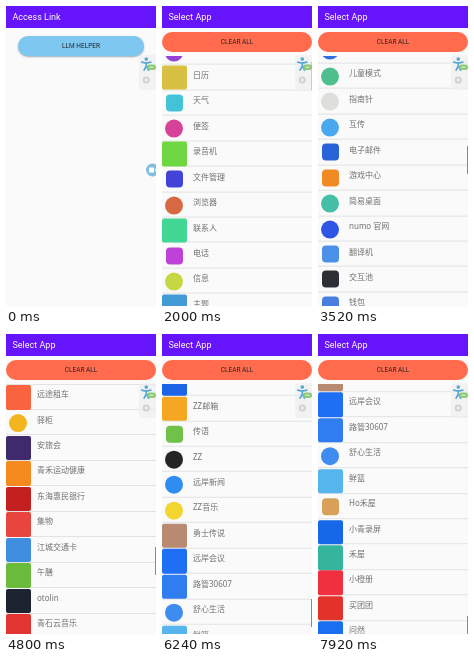
Write an HTML page that moves like this. It is 150 px wide and 300 px high and loops after 8 s.

```html
<!DOCTYPE html>
<html lang="zh-CN">
<head>
<meta charset="utf-8">
<style>
html, body { margin: 0; width: 100%; height: 100%; overflow: hidden; }
#stage { position: relative; width: 150px; height: 300px; overflow: hidden; background: #d8d4df; font-family: Roboto, sans-serif; }
#stage * { position: absolute; box-sizing: border-box; }
.page { left: 0; top: -13px; width: 150px; height: 332px; overflow: hidden; background: #fafafa; transform-origin: 0 13px; }
.status { top: 0; width: 150px; height: 13px; background: #4a18b8; color: #fff; font-size: 6px; line-height: 15px; }
.body { top: 13px; width: 150px; height: 319px; }
.title { width: 150px; height: 22px; padding-left: 6.5px; background: #6514fb; color: #fff; font-size: 9px; line-height: 22px; }
.btn { height: 20px; border-radius: 10px; color: #26282c; font-size: 6.5px; line-height: 20px; text-align: center; }
#open { left: 12px; top: 30px; width: 126px; background: #7dc7f0; box-shadow: 0 1px 2px #9ab; }
#clear { left: 0; top: 26px; width: 150px; background: #ff6b4c; }
.handle { left: 45px; top: 324px; width: 60px; height: 2px; background: #ccc; }
#list { top: 50px; width: 150px; height: 269px; overflow: hidden; }
#rows { left: 0; top: 0; width: 150px; }
.row { width: 150px; height: 25.45px; border-bottom: 1px solid #e3e3e3; }
.row span { left: 31px; top: 3.5px; font: 8px/12px "Noto Sans", "Noto Sans CJK SC", sans-serif; color: #707070; white-space: nowrap; }
.s { left: 0; top: .5px; width: 25px; height: 24.5px; border-radius: 2px; }
.r { left: 4px; top: 4px; width: 17px; height: 17px; border-radius: 4px; }
.c { left: 3px; top: 4px; width: 18px; height: 18px; border-radius: 50%; }
#thumb { left: 148.5px; width: 1.5px; height: 28px; background: #8a8a8a; }
svg { left: 0; top: 0; }
</style>
</head>
<body>
<div id="stage">
  <div class="page" id="home">
    <div class="status"><span style="left:47px">%</span>
      <svg width="150" height="13" fill="none" stroke="#fff"><path d="M129 4v5m-2-2l2 2 2-2m-5 4h6"/></svg>
    </div>
    <div class="body">
      <div class="title">Access Link</div>
      <div class="btn" id="open">LLM HELPER</div>
    </div>
    <div class="handle"></div>
  </div>
  <div class="page" id="picker">
    <div style="left:39px;top:6px;width:5px;height:5px;border-radius:1px;background:#4a86d8"></div>
    <div class="body" id="content">
      <div class="title">Select App</div>
      <div class="btn" id="clear">CLEAR ALL</div>
      <div id="list"><div id="rows"></div></div>
      <div id="thumb"></div>
    </div>
    <div class="handle"></div>
  </div>
  <svg width="150" height="300">
    <rect x="133" y="49" width="22" height="35" rx="4" fill="#eee" opacity=".65"/>
    <g stroke="#57a8d8" stroke-width="1.7" stroke-linecap="round" fill="none">
      <circle cx="140.3" cy="53" r="1" fill="#57a8d8"/>
      <path d="M135.8 56.2l3 .6h3l3-.6M140.3 57v3l-2.2 4.2M140.3 60l2.2 4.2"/>
    </g>
    <rect x="141" y="58.5" width="9" height="5.5" rx="2.7" fill="#8cc878"/>
    <path d="M143.5 61.2h4" stroke="#e9f7e4"/>
    <circle cx="140.3" cy="74" r="2.6" fill="#eee" stroke="#d0d0d0" stroke-width="1.8"/>
    <g id="cam">
      <circle cx="146.5" cy="164" r="6.5" fill="#82bfdf"/>
      <path d="M143 161.5h5v5h-5zM148.5 164l2.5-2v4z" fill="#fff"/>
    </g>
  </svg>
</div>
<script>
const $ = id => document.getElementById(id);
const PITCH = 25.45, LOOP = 8000;

// name, or name:shape+colour (s full square, r rounded square, c circle)
const apps = `设置 相机 相册 日历 天气 便签 录音机 文件管理 浏览器 联系人 电话 信息 主题 收音机
Clash_for_Android:r24406e LOMA安栖家居:sf8d716 勇士营地:se2b04c 伴行:sf9dc12 云帆知学词典:se83b35 饭来啦:s1e96f5
闹钟时钟:rededed 短视频:cf4776b 一键锁屏:c6a7a92 计算器:re9e9ec
应用商店 音乐 视频 系统升级 语音助手 手电筒 阅读 帮助中心 云服务:c2f6fe0
儿童模式:c4fbf8d 指南针:cdededa 互传:c4aa8ee 电子邮件:r2a62d8 游戏中心:rf08a24 简易桌面:c45bfa6 numo_官网:c2f55e6
翻译机:r4a90e8 交互池:r2c3036 钱包:r4a7de0
地图 健康 家庭相册 打印 扫一扫 画板 记账本 备忘录 放大镜 遥控器 远程协助 智能识物 电子书 课程表 公交查询 学习助手
远途租车:sf9633e 驿柜:cf3b51d 安旅会:s3f2a6e 青禾运动健康:sf58a1f 东海惠民银行:sc4201f 集物:se8453f 江城交通卡:s3f8ee0
午膳:s6abb3c otolin:s1b2330 青石云音乐:se3352f
菜谱 跑步 背单词 拼图 写字板 听书 快递查询 倒数日 出行助手:s1d63e8
ZZ邮箱:sf5a623 传语:r6fc14a ZZ:c252528 远岸新闻:c2f8cf0 ZZ音乐:cf3d531 勇士传说:sb88a72 远岸会议:s1f6ff5
路管30607:s2f7df0 舒心生活:c3f8cf0 鲜篮:s55b5ec Ho禾屋:rd9a05a 小青录屏:s1668e8 禾屋:s35b59b 小橙册:sf0303f
买团团:se2322a 问然:s1a6ff0`.split(/\s+/);

$('rows').innerHTML = apps.map((app, i) => {
  const [name, icon] = app.split(':');
  const color = icon ? '#' + icon.slice(1) : `hsl(${i * 137 % 360} 65% 55%)`;
  const shape = icon ? icon[0] : 'src'[i % 3];
  return `<div class="row" style="top:${i * PITCH}px"><i class="${shape}" style="background:${color}"></i><span>${name.replace(/_/g, ' ')}</span></div>`;
}).join('');

// time, scroll offset, speed
const keys = [
  [1760, 0, .2], [2640, 14 * PITCH, .47], [3520, 33 * PITCH - 7, .53],
  [4800, 59 * PITCH, .43], [6240, 78 * PITCH - 11, .18], [7920, 84 * PITCH - 7, .04]
];

function scrollAt(t) {
  t = Math.min(Math.max(t, 1760), 7920);
  const k = Math.max(1, keys.findIndex(key => key[0] >= t));
  const [t0, y0, v0] = keys[k - 1], [t1, y1, v1] = keys[k];
  const d = t1 - t0, u = (t - t0) / d, w = 1 - u;
  return w * w * ((1 + 2 * u) * y0 + u * d * v0) + u * u * ((3 - 2 * u) * y1 - w * d * v1);
}

function ease(t, a, b) {
  const u = Math.min(1, Math.max(0, (t - a) / (b - a)));
  return u * u * (3 - 2 * u);
}

function place(page, x, zoom, lift) {
  page.style.transform = `translate(${x}px,${12 * lift}px) scale(${zoom})`;
  page.style.borderRadius = 7 * lift + 'px';
}

function draw(t) {
  const lift = ease(t, 960, 1110) - ease(t, 1480, 1700);
  const zoom = 1 - .08 * lift, step = 150 * zoom + 7;
  const x = 75 * (1 - zoom) - ease(t, 960, 1583) * step;
  place($('home'), x, zoom, lift);
  place($('picker'), x + step, zoom, lift);
  $('content').style.visibility = t < 1440 ? 'hidden' : 'visible';
  $('cam').style.opacity = 1 - ease(t, 300, 900);
  const s = scrollAt(t);
  $('rows').style.transform = `translateY(${1 - s}px)`;
  $('thumb').style.top = 49 + s * .1095 + 'px';
}

const start = performance.now();
function tick() {
  draw((performance.now() - start) % LOOP);
  requestAnimationFrame(tick);
}
tick();
</script>
</body>
</html>
```
